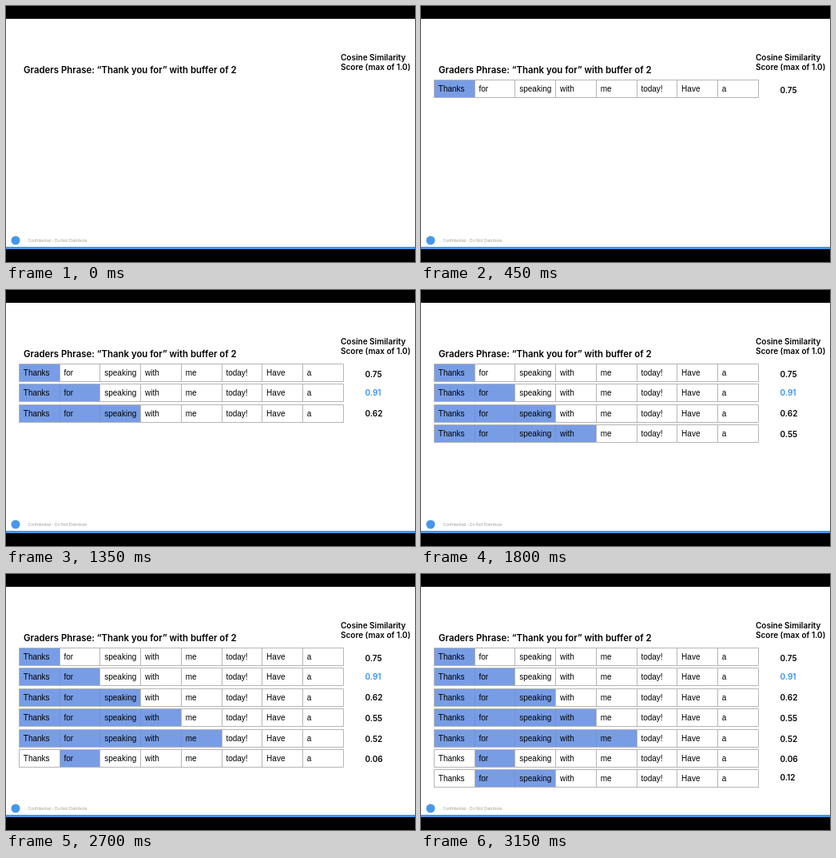
An HTML page that plays this animation: 512 by 320 pixels, repeating every 3600 ms.

```html
<!DOCTYPE html>
<html lang="en">
<head>
<meta charset="utf-8">
<title>Cosine similarity</title>
<style>
  html, body { margin: 0; width: 100%; height: 100%; overflow: hidden; background: #fff; }
  svg { display: block; width: 100vw; height: 100vh; }
  text { font-family: Inter, sans-serif; }
  .head { font-weight: 600; }
  .cell { font: 10px "Liberation Sans", Arial, sans-serif; }
  .score { font-size: 10px; font-weight: 600; }
</style>
</head>
<body>
<svg viewBox="0 0 512 320">
  <rect width="512" height="320" fill="#fff"/>
  <rect width="512" height="16"/>
  <rect y="301" width="512" height="3" fill="#4596ec"/>
  <rect y="304" width="512" height="16"/>
  <text class="head" x="22" y="84" font-size="11.4">Graders Phrase: “Thank you for” with buffer of 2</text>
  <text class="head" font-size="10"><tspan x="419" y="68.4">Cosine Similarity</tspan><tspan x="419" y="80.4">Score (max of 1.0)</tspan></text>
  <circle cx="12" cy="293" r="5.5" fill="#4596ec"/>
  <text x="27.5" y="295.2" font-size="5" fill="#999">Confidential - Do Not Distribute</text>
  <g id="rows"></g>
</svg>
<script>
const STEP = 450, LOOP = 3600;
const LEFT = 16.5, TOP = 92, COL = 50.72, PITCH = 25.4, HEIGHT = 22;
const words = ["Thanks", "for", "speaking", "with", "me", "today!", "Have", "a"];
// Each row: first marked word, end of marked words, score, score baseline
const data = [
  [0, 1, "0.75", 109], [0, 2, "0.91", 132], [0, 3, "0.62", 158], [0, 4, "0.55", 184],
  [0, 5, "0.52", 209.5], [1, 2, "0.06", 235], [1, 3, "0.12", 258]
];

function add(parent, tag, attrs, text) {
  const el = document.createElementNS("http://www.w3.org/2000/svg", tag);
  for (const key in attrs) el.setAttribute(key, attrs[key]);
  if (text) el.textContent = text;
  return parent.appendChild(el);
}

function makeRow([from, to, score, baseline], i) {
  const g = add(document.getElementById("rows"), "g", { visibility: "hidden" });
  const y = Math.round(TOP + i * PITCH) + 0.5;
  const colX = c => Math.round(LEFT + c * COL - 0.5) + 0.5;
  const right = colX(words.length);
  add(g, "rect", { x: colX(from), y, width: colX(to) - colX(from), height: HEIGHT, fill: "#789de5" });
  let lines = `M${LEFT} ${y}H${right}V${y + HEIGHT}H${LEFT}Z`;
  let inner = "";
  for (let c = 1; c < words.length; c++) {
    const line = `M${colX(c)} ${y}v${HEIGHT}`;
    if (c > from && c < to) inner += line;
    else lines += line;
  }
  add(g, "path", { d: lines, fill: "none", stroke: "#b5b5b5" });
  if (inner) add(g, "path", { d: inner, stroke: "#7092d6" });
  words.forEach((word, c) =>
    add(g, "text", { class: "cell", x: LEFT + c * COL + 5.3, y: y + 14.3 }, word));
  add(g, "text", { class: "score", x: 449.5, y: baseline, fill: i === 1 ? "#3090f0" : "#000" }, score);
  return g;
}

const rows = data.map(makeRow);

function draw(ms) {
  const shown = Math.floor((ms % LOOP) / STEP);
  rows.forEach((row, i) => row.setAttribute("visibility", i < shown ? "visible" : "hidden"));
}

function tick() {
  draw(performance.now());
  requestAnimationFrame(tick);
}
tick();
</script>
</body>
</html>
```
